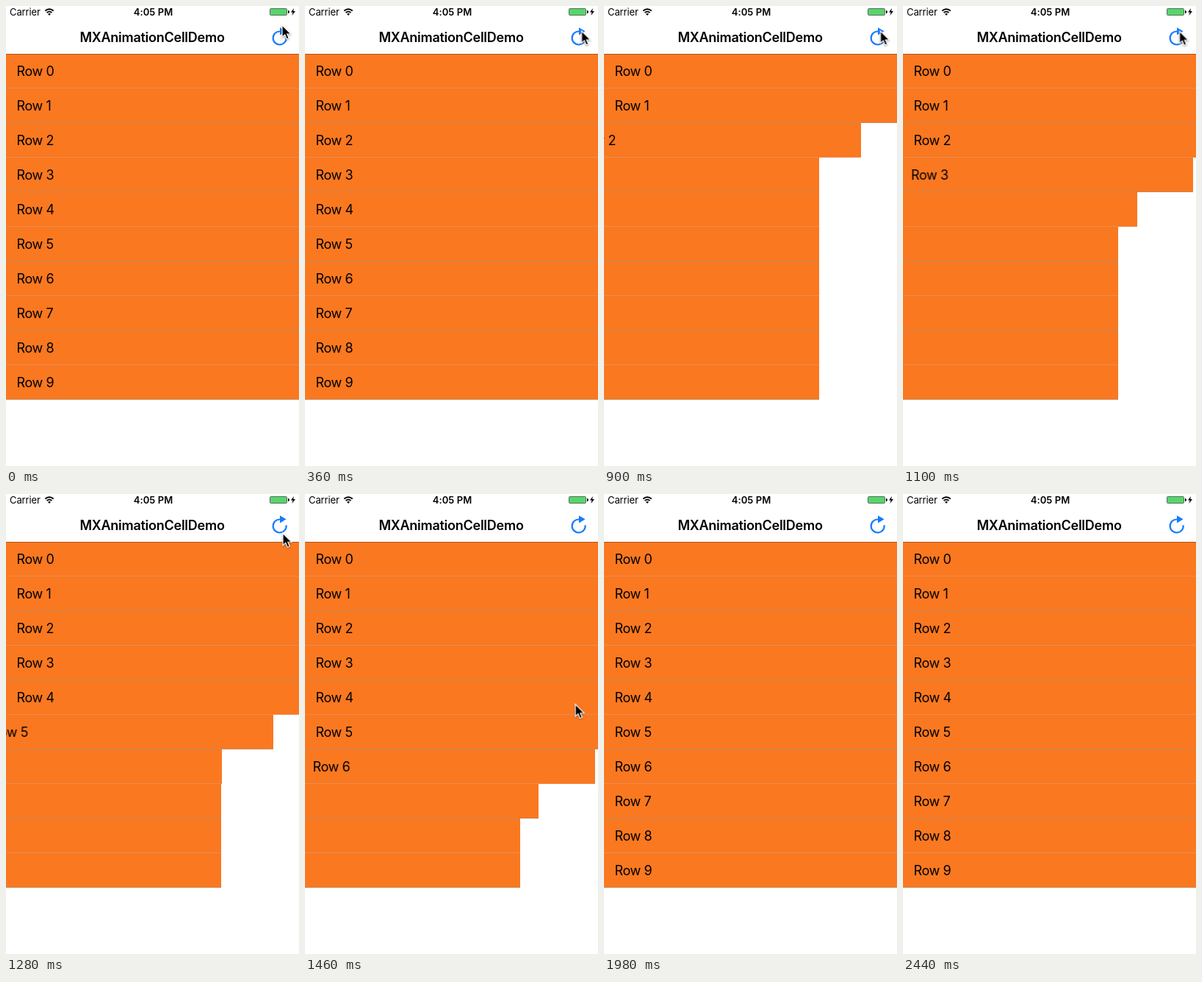
An HTML page for the animation above (2.64 s loop, 399x625 px).

```html
<!DOCTYPE html>
<html lang="en">
<head>
<meta charset="utf-8">
<title>MXAnimationCellDemo</title>
<style>
  html, body { margin: 0; width: 100%; height: 100%; overflow: hidden; background: #fff; }
  #stage {
    position: relative; width: 399px; height: 625px; overflow: hidden;
    background: #fff; color: #000; font-family: Inter, Roboto, sans-serif;
  }
  #stage > * { position: absolute; }
  .status { top: 0; font-size: 13px; line-height: 16px; white-space: nowrap; }
  .carrier { left: 5px; letter-spacing: -.1px; }
  .clock { left: 0; width: 401px; text-align: center; font-weight: 600; letter-spacing: .1px; }
  .title {
    top: 30.5px; left: 0; width: 398px; text-align: center;
    font-size: 18px; line-height: 24px; font-weight: 600; letter-spacing: -.26px;
  }
  .rule { top: 65px; left: 0; width: 399px; height: 1px; background: rgba(0, 0, 0, .3); }
  #list { top: 65px; left: 0; width: 399px; }
  .row {
    box-sizing: border-box; height: 47px; padding-left: 14.6px;
    font-size: 18px; line-height: 47px; letter-spacing: -.42px;
    background: #fa7820; border-bottom: 1px solid #e98d54;
  }
  .row:nth-child(even) { border-bottom-color: #c78a5a; }
  svg { left: 0; top: 0; overflow: visible; }
</style>
</head>
<body>
<div id="stage">
  <div class="status carrier">Carrier</div>
  <div class="status clock">4:05 PM</div>
  <div class="title">MXAnimationCellDemo</div>
  <div id="list"></div>
  <div class="rule"></div>
  <svg width="399" height="65">
    <g fill="none" stroke="#000" stroke-width="2">
      <path d="M53.3 6.6a8.2 8.2 0 0 1 11.4 0M55.6 9a5 5 0 0 1 6.8 0"/>
      <path d="M59 13l-2-2.2a3 3 0 0 1 4 0z" fill="#000" stroke="none"/>
    </g>
    <rect x="359.5" y="3.5" width="23" height="9" rx="1" fill="#53d769" stroke="#666"/>
    <path d="M384 6h.6q1.4 .5 1.4 2t-1.4 2h-.6z"/>
    <path d="M392 3l-4 5.5h2.6l-1.2 4.5 4.6-6h-2.8z"/>
    <g id="reload">
      <path d="M381.6 42.3A9 9 0 1 1 373 34.5" fill="none" stroke="#167bfb" stroke-width="2.2"/>
      <path d="M373 29.2v10.3l8.6-5.2z" fill="#167bfb"/>
    </g>
  </svg>
  <svg id="cursor" width="14" height="21">
    <path d="M0 0v16.5l3.8-3.5 2.5 6 3-1.3-2.5-5.7h5.2z"
      stroke="#fff" stroke-width="1.2" style="filter: drop-shadow(0 1px 1px #0006)"/>
  </svg>
</div>
<script>
const LOOP = 2640, TAP = 541, STEP = 120.5, SLIDE = 228, SHIFT = -106;
const $ = id => document.getElementById(id);
const shift = (x, y = 0) => ({ transform: `translate(${x}px, ${y}px)` });

// Each step: [time in ms, style, easing towards the next step]
function play(el, steps) {
  const frames = steps.map(([t, style, easing = 'linear']) =>
    ({ ...style, offset: t / LOOP, easing }));
  el.animate(frames, { duration: LOOP, iterations: Infinity });
}

for (let i = 0; i < 10; i++) {
  const row = document.createElement('div');
  row.className = 'row';
  row.textContent = `Row ${i}`;
  $('list').append(row);
  const start = TAP + STEP * i;
  play(row, [
    [0, shift(0)], [TAP, shift(0)], [TAP, shift(SHIFT)],
    [start, shift(SHIFT), 'ease-in-out'],
    [start + SLIDE, shift(0)], [LOOP, shift(0)]
  ]);
}

play($('reload'), [
  [0, { opacity: 1 }], [430, { opacity: 1 }], [430, { opacity: .2 }],
  [550, { opacity: .2 }, 'ease-in-out'], [920, { opacity: 1 }], [LOOP, { opacity: 1 }]
]);

play($('cursor'), [
  [0, shift(376, 26), 'ease-in-out'], [130, shift(383, 18), 'ease-in-out'],
  [380, shift(376.5, 34)], [1080, shift(376.5, 34), 'ease-in'],
  [1280, shift(377, 53), 'cubic-bezier(.4, .1, .7, .9)'],
  [1620, shift(359, 525)], [1660, shift(356.5, 547)],
  [1860, shift(350, 650)], [1860, shift(350, 700)], [LOOP, shift(350, 700)]
]);
</script>
</body>
</html>
```
